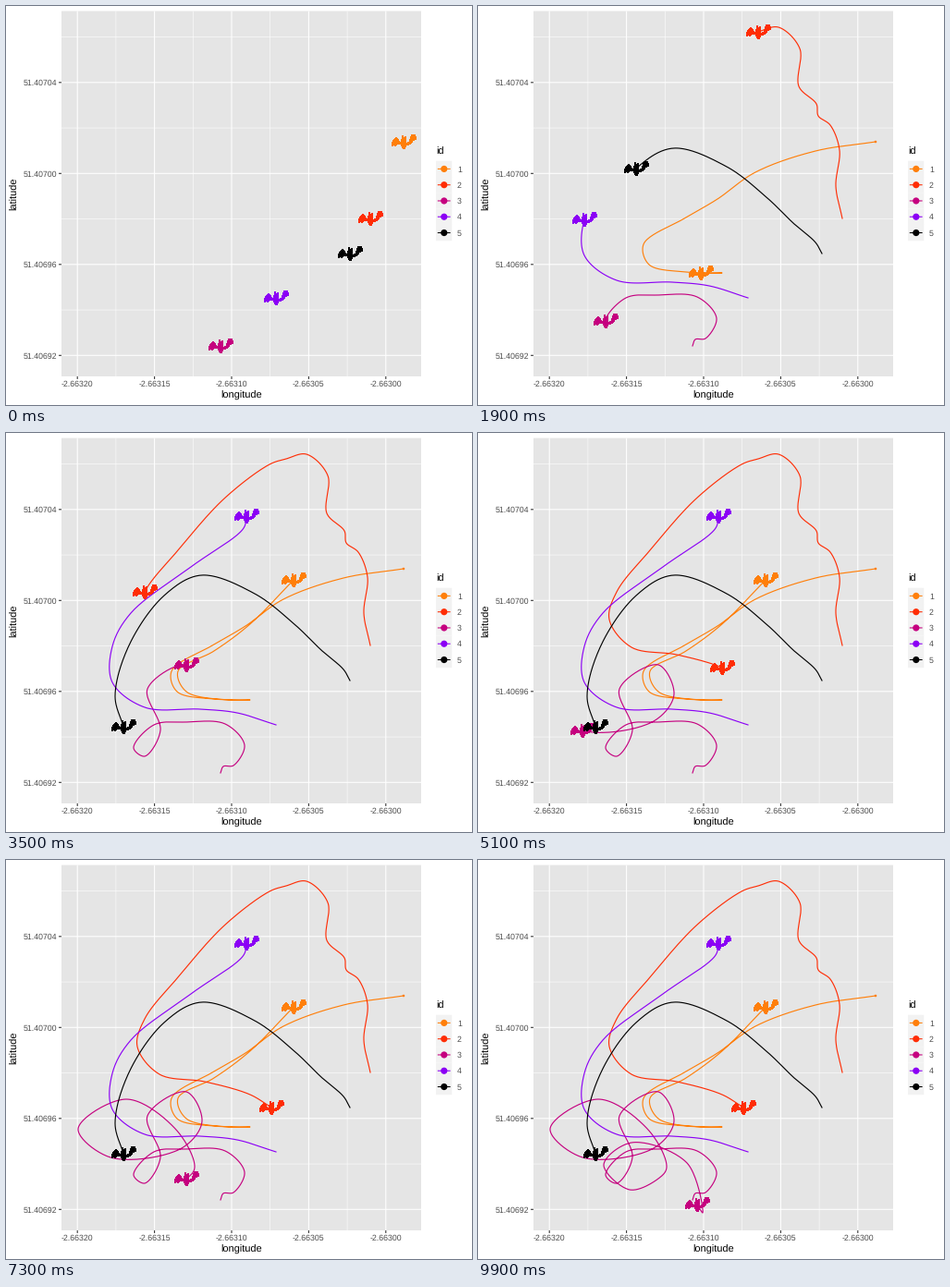
A matplotlib script for the animation above (10000 ms loop, 504x432 px).

```python
import numpy as np
import matplotlib.pyplot as plt
from matplotlib.animation import FuncAnimation
from matplotlib.patches import Circle, Polygon, Rectangle

W, H, DPI = 504, 432, 72
FRAMES, INTERVAL = 100, 100
SUB = 24  # curve samples between two way points

plt.rcParams.update({"font.family": "Liberation Sans", "text.hinting": "none",
                     "path.snap": False})

# Way points are (x, y) or, where the moment matters, (x, y, frame).
FLIGHTS = {
    "#FF7F0A": [
        (430, 147, 0), (365, 157), (300, 180), (259, 209), (225, 229),
        (179, 258, 12), (185, 280), (225, 288), (264, 289), (241, 289, 19),
        (195, 280), (186, 258), (225, 236), (265, 206), (311, 159, 32)],
    "#FF2D05": [
        (394, 230, 0), (387, 195), (391, 156), (381, 129), (368, 119),
        (366, 106), (347, 87, 12), (348, 46), (325, 23), (303, 28, 19),
        (285, 34), (236, 71), (186, 127), (150, 172, 35), (142, 202),
        (166, 232), (215, 240), (264, 254, 51), (287, 268, 54)],
    "#C5007F": [
        (232, 368, 0), (235, 361), (246, 360), (258, 338), (237, 315),
        (194, 313, 12), (160, 316), (138, 341, 19), (150, 350), (167, 322),
        (153, 277), (195, 251, 35), (212, 283), (190, 312), (113, 322, 51),
        (78, 291), (130, 259), (184, 292), (204, 333), (195, 345, 73),
        (164, 357, 77), (136, 330), (166, 306), (226, 328), (243, 382),
        (237, 373, 99)],
    "#8B00F5": [
        (292, 316, 0), (250, 303), (210, 299), (150, 297, 12), (115, 270),
        (115, 231, 19), (135, 195), (200, 145), (257, 103), (260, 90, 34)],
    "#000000": [
        (372, 268, 0), (365, 256), (342, 236), (313, 208), (269, 174, 12),
        (211, 154), (171, 176, 19), (133, 230), (118, 285), (127, 318, 34)],
}

# Bat silhouette around its centre.
BAT = np.array([
    (-13, 5), (-12, 0), (-8, -5), (-3, 2), (-1, -7), (0, -4), (2, -6), (3, 2),
    (6, 0), (9, -8), (12, -8), (14, -3), (10, -1), (8, 2), (3, 4), (1, 8),
    (-1, 7), (-3, 3), (-7, 3), (-9, 5), (-10, 3)])


def spline(points):
    """Smooth curve through points, SUB samples per span."""
    p = np.array(points, float)
    h = np.sqrt(np.hypot(*np.diff(p, axis=0).T))[:, None]
    v = np.diff(p, axis=0) / h
    inner = (v[:-1] * h[1:] + v[1:] * h[:-1]) / (h[:-1] + h[1:])
    m = np.vstack([v[0], inner, v[-1]])
    t = (np.arange(SUB) / SUB)[None, :, None]
    a, b, ma, mb, h = (q[:, None] for q in (p[:-1], p[1:], m[:-1], m[1:], h))
    q = (a + (b - a) * t * t * (3 - 2 * t)
         + h * t * (1 - t) * (ma * (1 - t) - mb * t))
    return np.vstack([q.reshape(-1, 2), p[-1]])


class Flight:
    """A bat and its trail, at even speed between timed way points."""

    def __init__(self, color, points):
        self.curve = spline([p[:2] for p in points])
        steps = np.hypot(*np.diff(self.curve, axis=0).T)
        self.dist = np.concatenate([[0], np.cumsum(steps)])
        timed = [i for i, p in enumerate(points) if len(p) == 3]
        self.times = [points[i][2] for i in timed]
        self.marks = [self.dist[i * SUB] for i in timed]
        self.trail, = ax.plot([], [], color=color, lw=1.15, zorder=3,
                              solid_joinstyle="round")
        self.bat = Polygon(BAT, fc=color, ec="none", zorder=4,
                           antialiased=False)
        ax.add_patch(self.bat)

    def show(self, frame):
        s = np.interp(frame, self.times, self.marks)
        pos = [np.interp(s, self.dist, axis) for axis in self.curve.T]
        path = np.vstack([self.curve[self.dist < s], pos])
        self.trail.set_data(*path.T)
        self.bat.set_xy(BAT + pos)
        return self.trail, self.bat


def box(x, y, w, h, color):
    ax.add_patch(Rectangle((x, y), w, h, fc=color, ec="none", zorder=0))


def dot(x, y, r, color):
    ax.add_patch(Circle((x, y), r, fc=color, ec="none", zorder=2))


def line(x, y, color, lw=1.07):
    ax.plot(x, y, color=color, lw=lw, zorder=1, solid_capstyle="butt")


def label(x, y, text, size=8.8, color="#4D4D4D", ha="center", **kw):
    ax.text(x, y, text, size=size, color=color, ha=ha, **kw)


def draw_panel():
    left, top, right, bottom = 60, 5.5, 449, 401
    dx, dy = 83.4, 98.5
    xs = 77.2 + dx * np.arange(5)
    ys = 82.8 + dy * np.arange(4)
    box(left, top, right - left, bottom - top, "#E5E5E5")
    for x in xs[:-1] + dx / 2:
        line([x, x], [top, bottom], "white", 0.55)
    for y in ys - dy / 2:
        line([left, right], [y, y], "white", 0.55)
    for i, x in enumerate(xs):
        line([x, x], [top, bottom], "white")
        line([x, x], [bottom, bottom + 3], "#333333")
        label(x, 412.3, f"{-2.6632 + 0.00005 * i:.5f}")
    for i, y in enumerate(ys):
        line([left, right], [y, y], "white")
        line([left - 3, left], [y, y], "#333333")
        label(55.3, y + 3.2, f"{51.40704 - 0.00004 * i:.5f}", ha="right")
    label(254.5, 425, "longitude", 11, "black")
    label(9.4, 203, "latitude", 11, "black", va="center", rotation=90)


def draw_legend():
    label(465, 161, "id", 11, "black", ha="left")
    for i, color in enumerate(FLIGHTS):
        y = 176.4 + 17.28 * i
        box(465, y - 8.64, 17.28, 17.28, "#F2F2F2")
        line([466.8, 480.6], [y, y], color)
        dot(473.8, y, 3.6, color)
        label(488, y + 3.2, str(i + 1), ha="left")


fig = plt.figure(figsize=(W / DPI, H / DPI), dpi=DPI, facecolor="white")
ax = fig.add_axes([0, 0, 1, 1])
ax.set(xlim=(0, W), ylim=(H, 0))
ax.axis("off")

draw_panel()
draw_legend()
dot(430, 147, 1.3, "#FF7F0A")
flights = [Flight(*item) for item in FLIGHTS.items()]


def update(frame):
    return [artist for f in flights for artist in f.show(frame)]


anim = FuncAnimation(fig, update, frames=FRAMES, interval=INTERVAL,
                     init_func=lambda: update(0), repeat=True, repeat_delay=0)
plt.show()
```
